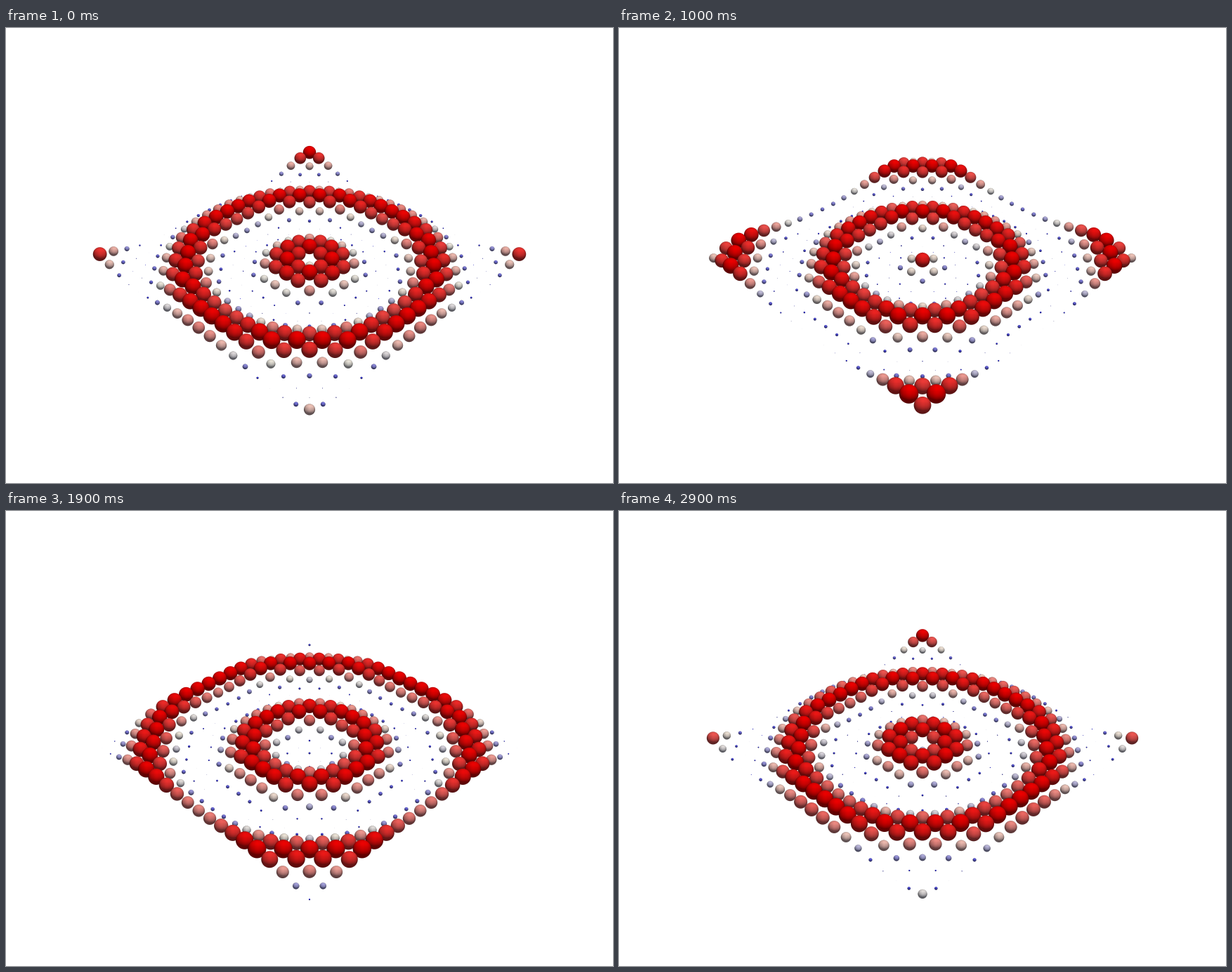
A matplotlib script for the animation above (3000 ms loop, 864 by 648 pixels).

```python
import numpy as np
import matplotlib.pyplot as plt
from matplotlib.animation import FuncAnimation

W, H, DPI = 864, 648, 100
FRAMES, INTERVAL = 30, 100

# Grid of balls on a radial wave
gx, gy = [a.ravel() for a in np.meshgrid(np.arange(-10, 10), np.arange(-10, 10))]
dist = np.hypot(gx, gy)
AMP, MAX_R = 0.5, 0.5

# Isometric perspective camera
FOCUS = np.array([-0.528, -0.528, 0.253])
CAM_DIST = 54.56
FOCAL = H / 2 / np.tan(np.radians(15))
RIGHT = np.array([-1, 1, 0]) / np.sqrt(2)
UP = np.array([-1, -1, 2]) / np.sqrt(6)
TOWARD = np.array([1, 1, 1]) / np.sqrt(3)


def light(elevation, azimuth, strength, color):
    el, az = np.radians([elevation, azimuth])
    way = np.array([np.cos(el) * np.sin(az), np.sin(el), np.cos(el) * np.cos(az)])
    return way, strength * np.array(color)


NEUTRAL = (1, 1, 1)
LIGHTS = [
    light(50, 10, 0.75, (1, 0.9723, 0.9021)),       # key
    light(-75, 0, 0.25, (0.9824, 0.9827, 1)),       # fill
    light(0, 0, 0.25, NEUTRAL),                     # head
    light(0, 110, 0.214, NEUTRAL),                  # back
    light(0, -110, 0.214, NEUTRAL),
]
LIGHT_DIRS = np.array([way for way, _ in LIGHTS])
LIGHT_COLORS = np.array([color for _, color in LIGHTS])


def blue_white_red(v):
    return np.stack([np.minimum(1, 1 + v), 1 - np.abs(v), np.minimum(1, 1 - v)], axis=-1)


def draw_ball(img, cx, cy, r, color):
    x0, x1 = int(cx - r - 1), int(cx + r + 2)
    y0, y1 = int(cy - r - 1), int(cy + r + 2)
    dx = (np.arange(x0, x1) + 0.5 - cx)[None, :]
    dy = (cy - np.arange(y0, y1) - 0.5)[:, None]
    d = np.hypot(dx, dy)
    alpha = np.clip(r - d + 0.5, 0, 1) * min(1, 2 * r)

    # Surface normal, held on the rim outside the disc
    rim = np.maximum(d, r)
    nx, ny = dx / rim, dy / rim
    nz = np.sqrt(np.clip(1 - nx**2 - ny**2, 0, 1))
    normal = np.stack([nx, ny, nz], axis=-1)
    shade = np.clip(normal @ LIGHT_DIRS.T, 0, None) @ LIGHT_COLORS

    patch = img[y0:y1, x0:x1]
    patch += alpha[..., None] * (np.minimum(1, color * shade) - patch)


def render(k):
    v = np.sin(dist + 2 * np.pi * k / FRAMES)
    pos = np.stack([gx, gy, AMP * v], axis=-1) - FOCUS
    near = pos @ TOWARD
    scale = FOCAL / (CAM_DIST - near)
    cx = W / 2 + scale * (pos @ RIGHT)
    cy = H / 2 - scale * (pos @ UP)
    radius = scale * MAX_R * (v + 1) / 2
    colors = blue_white_red(v)

    img = np.ones((H, W, 3))
    for i in np.argsort(near):
        if radius[i] > 0.03:
            draw_ball(img, cx[i], cy[i], radius[i], colors[i])
    return img


fig = plt.figure(figsize=(W / DPI, H / DPI), dpi=DPI, facecolor="white")
ax = fig.add_axes([0, 0, 1, 1])
ax.axis("off")
view = ax.imshow(render(0), interpolation="nearest", aspect="auto")


def update(k):
    view.set_data(render(k))
    return [view]


anim = FuncAnimation(fig, update, frames=FRAMES, interval=INTERVAL,
                     repeat=True, repeat_delay=0)
plt.show()
```
